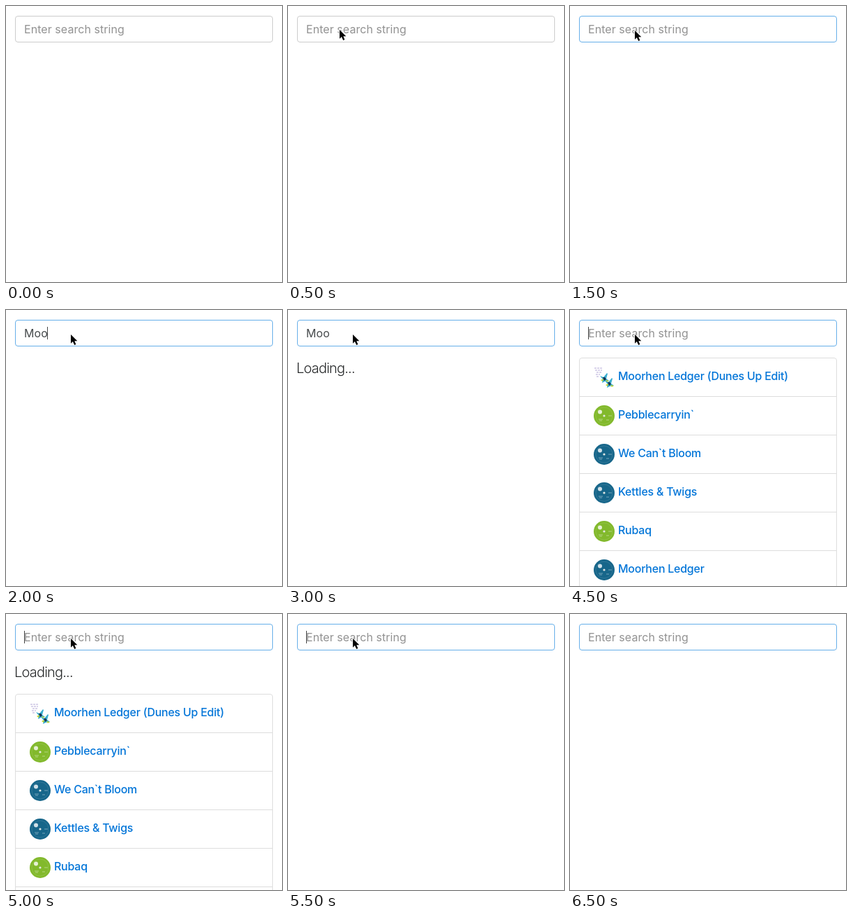
Write an HTML page that moves like this. It is 396 px wide and 394 px high and loops after 6750 ms.

```html
<!DOCTYPE html>
<html lang="en">
<head>
<meta charset="utf-8">
<title>Live search</title>
<style>
  html, body { margin: 0; width: 100%; height: 100%; overflow: hidden; background: #fff; }
  body { position: relative; font: 16px/24px Inter, "Open Sans", sans-serif; }
  body * { box-sizing: border-box; }

  /* Every part shares one clock and changes in hard steps. */
  .field, .hint, .typed span, .caret, .loading, .results, .pointer {
    animation: 6.75s step-end infinite;
  }

  .field {
    position: absolute; left: 13px; top: 14px; width: 370px; height: 38px;
    border: 1px solid #ccc; border-radius: 4px;
    letter-spacing: .06px; animation-name: focus;
  }
  .hint, .typed { position: absolute; left: 12px; top: 6px; white-space: nowrap; }
  .hint { color: #929292; animation-name: hint; }
  .typed { color: #464a4c; }
  .typed .first { animation-name: first; }
  .typed .second { animation-name: second; }
  .typed .third { animation-name: third; }
  .caret {
    position: absolute; left: 26px; top: 24px; width: 1px; height: 18px;
    background: #444; animation-name: caret;
  }

  .loading {
    position: absolute; left: 12px; top: 68px; margin: 0;
    font-size: 20px; font-weight: 300; line-height: 30px; letter-spacing: -.8px;
    color: #292b2c; animation-name: loading;
  }

  .results {
    position: absolute; left: 13px; top: 68px; width: 370px; margin: 0; padding: 0;
    list-style: none; animation-name: results;
  }
  .results li {
    display: flex; align-items: center; gap: 5px;
    height: 56px; margin-bottom: -1px; padding: 0 20px; border: 1px solid #ddd;
  }
  .results li:first-child { border-radius: 4px 4px 0 0; }
  .results svg { flex: none; width: 30px; height: 30px; }
  .results span {
    position: relative; top: -2px; white-space: nowrap;
    font-weight: 500; letter-spacing: -.25px; color: #0275d8;
  }
  .green { color: #82b92c; }
  .blue { color: #17668a; }

  .pointer {
    position: absolute; left: 0; top: 0; width: 14px; height: 20px;
    overflow: visible; animation-name: pointer;
  }

  @keyframes focus { 0% { border-color: #ccc } 14.814%, to { border-color: #66afe9 } }
  @keyframes hint { 0%, 66.666%, to { opacity: 1 } 25.925% { opacity: 0 } }
  @keyframes first { 0%, 66.666%, to { opacity: 0 } 25.925% { opacity: 1 } }
  @keyframes second { 0%, 66.666%, to { opacity: 0 } 29.629% { opacity: 1 } }
  @keyframes third { 0%, 62.962%, to { opacity: 0 } 29.629% { opacity: 1 } }
  @keyframes caret {
    0%, 22.222%, 96.296%, to { left: 26px; opacity: 0 }
    14.814% { left: 26px; opacity: 1 }
    25.925% { left: 40px; opacity: 1 }
    29.629%, 51.851% { left: 59px; opacity: 1 }
    44.444%, 59.259% { left: 59px; opacity: 0 }
    62.962% { left: 49px; opacity: 1 }
    66.666% { left: 26px; opacity: 1 }
  }
  @keyframes loading {
    0%, 51.851%, 81.481%, to { opacity: 0 }
    37.037%, 74.074% { opacity: 1 }
  }
  @keyframes results {
    0%, 81.481%, to { top: 68px; opacity: 0 }
    51.851% { top: 68px; opacity: 1 }
    74.074% { top: 114px; opacity: 1 }
  }
  @keyframes pointer {
    0%, 88.888%, to { transform: none; opacity: 0 }
    3.703% { transform: translate(47px, 29px); opacity: 1 }
    7.407% { transform: translate(74px, 34px); opacity: 1 }
    14.814% { transform: translate(93px, 35px); opacity: 1 }
  }
</style>
</head>
<body>
  <svg width="0" height="0" style="position:absolute">
    <symbol id="disc" viewBox="0 0 30 30">
      <circle cx="15" cy="15" r="15" fill="currentColor"/>
      <circle cx="15" cy="15" r="12" fill="none" stroke="#fff" stroke-opacity=".1"/>
      <circle cx="9" cy="9.5" r="3" fill="#fff" fill-opacity=".8"/>
      <path d="M21 15h5M7 20h6M8 22h4M18 21h4" stroke="#fff" stroke-opacity=".4"/>
      <circle cx="15" cy="15" r="1.6" fill="#e4e8e4"/>
    </symbol>
    <g id="bird">
      <path d="M0 4l5 2 5-6 1 1-2 7 4 3-6 1-4 2 1-5z" fill="#3aaed0"/>
      <path d="M4 6l3 0 2 3-3 2z" fill="#16324f"/>
      <path d="M1 10l4-2-1 4zM8 10l5 1-3 2z" fill="#c3d22e"/>
    </g>
    <symbol id="cover" viewBox="0 0 30 30">
      <path d="M1 2h12M2 5h10M4 8h7M3 11h6M4 14h4" stroke="#b3a8d6" stroke-dasharray="3 1"/>
      <use href="#bird" x="9" y="9"/>
      <use href="#bird" x="16" y="16"/>
    </symbol>
  </svg>

  <div class="field">
    <div class="hint">Enter search string</div>
    <div class="typed"><span class="first">M</span><span class="second">o</span><span class="third">o</span></div>
  </div>
  <div class="caret"></div>

  <p class="loading">Loading...</p>

  <ul class="results">
    <li><svg><use href="#cover"/></svg><span>Moorhen Ledger (Dunes Up Edit)</span></li>
    <li><svg class="green"><use href="#disc"/></svg><span>Pebblecarryin`</span></li>
    <li><svg class="blue"><use href="#disc"/></svg><span>We Can`t Bloom</span></li>
    <li><svg class="blue"><use href="#disc"/></svg><span>Kettles &amp; Twigs</span></li>
    <li><svg class="green"><use href="#disc"/></svg><span>Rubaq</span></li>
    <li><svg class="blue"><use href="#disc"/></svg><span>Moorhen Ledger</span></li>
  </ul>

  <svg class="pointer" viewBox="0 0 14 20">
    <path d="M0 0V12.8L2.9 10.1 5.2 15 7.4 14 5.3 9.3H9.3Z"
          fill="#000" stroke="#fff" stroke-width="1.6" paint-order="stroke"/>
  </svg>
</body>
</html>
```
